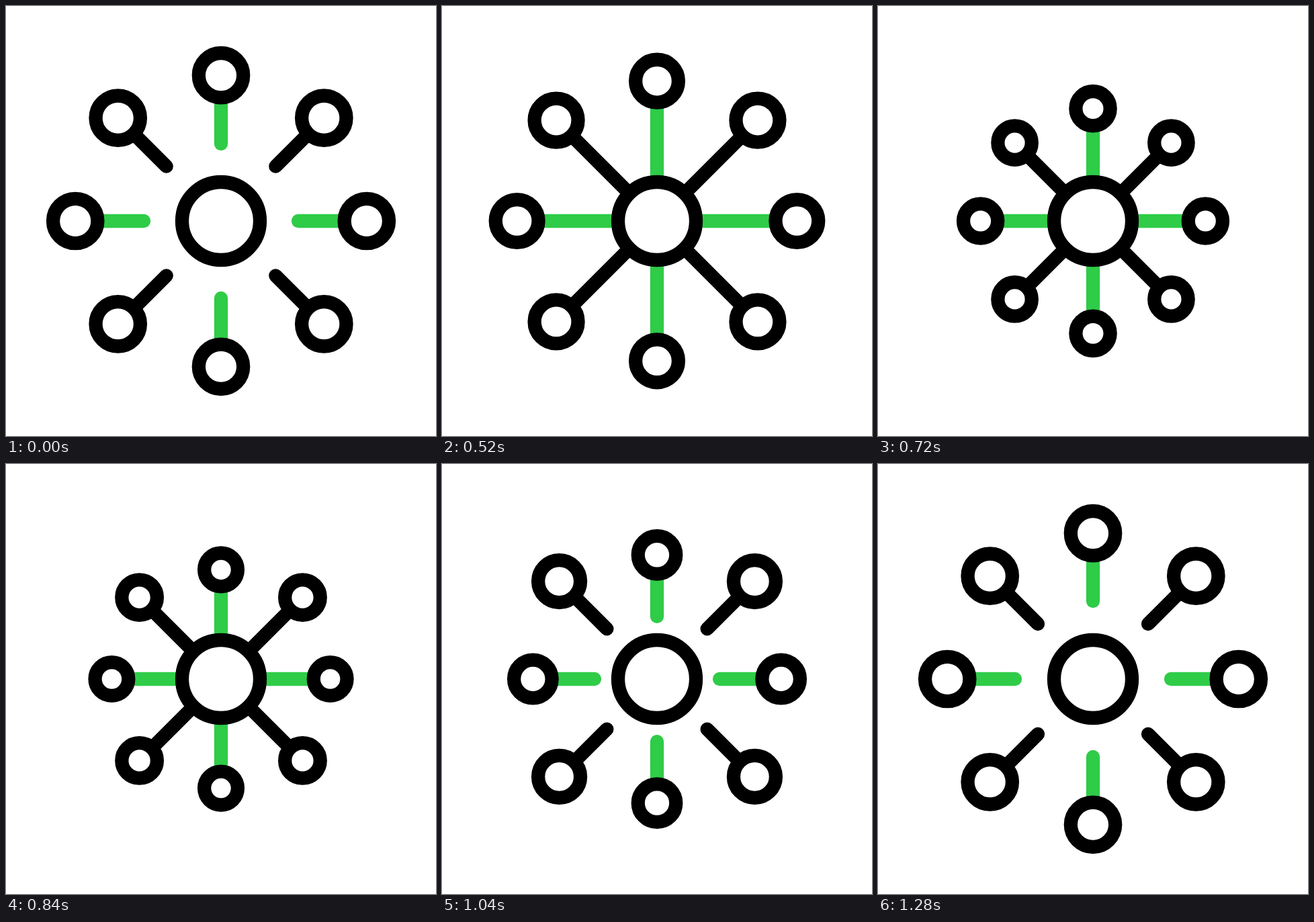
An HTML page with a canvas that plays this animation: 640x640 px, repeating every 1.64 s.

```html
<!DOCTYPE html>
<html lang="en">
<head>
<meta charset="utf-8">
<title>Hub and nodes</title>
<style>
  html, body { margin: 0; width: 100%; height: 100%; overflow: hidden; background: #fff; }
  canvas { display: block; width: 640px; height: 640px; }
</style>
</head>
<body>
<canvas id="stage" width="640" height="640"></canvas>
<script>
const ctx = document.getElementById('stage').getContext('2d');
const LOOP = 1640, STEP = 40;
const CENTER = 320, HUB = 58, ORBIT = 216.8, NODE = 33.2, STROKE = 20.3;
const BLACK = '#000', GREEN = '#2fcc48', WHITE = '#fff';

// scale: distance and size of the nodes; tip: inner end of the spoke at full scale
const groups = [
  {
    color: BLACK, turn: Math.PI / 4,
    scale: [[450, 1], [520, 0.978], [720, 0.7595], [755, 0.75], [920, 0.857], [1120, 0.989], [1200, 1]],
    tip: [[80, 115], [240, 95.7], [420, HUB], [690, HUB], [920, 100.9], [1120, 114.9], [1200, 116]]
  },
  {
    color: GREEN, turn: 0,
    scale: [[420, 1], [520, 0.961], [720, 0.772], [800, 0.75], [870, 0.75], [920, 0.763], [1120, 0.916], [1280, 1]],
    tip: [[80, 115], [240, 97.7], [440, HUB], [700, HUB], [920, 102.3], [1120, 112.2], [1280, 116]]
  }
];

const slope = (a, b) => (b[1] - a[1]) / (b[0] - a[0]);

// Tangent of a monotone curve, flat at ends and turning points
function tangent(keys, i) {
  if (i === 0 || i === keys.length - 1) return 0;
  const before = slope(keys[i - 1], keys[i]);
  const after = slope(keys[i], keys[i + 1]);
  return before * after > 0 ? 2 * before * after / (before + after) : 0;
}

function valueAt(keys, t) {
  if (t <= keys[0][0]) return keys[0][1];
  const i = keys.findIndex(key => key[0] > t) - 1;
  if (i < 0) return keys[keys.length - 1][1];
  const [t0, v0] = keys[i], [t1, v1] = keys[i + 1];
  const span = t1 - t0, u = (t - t0) / span, w = 1 - u;
  return v0 * w * w * (1 + 2 * u) + v1 * u * u * (3 - 2 * u)
    + span * u * w * (w * tangent(keys, i) - u * tangent(keys, i + 1));
}

function ring(x, radius) {
  ctx.beginPath();
  ctx.arc(x, 0, radius, 0, 2 * Math.PI);
  ctx.fillStyle = WHITE;
  ctx.fill();
  ctx.strokeStyle = BLACK;
  ctx.stroke();
}

function spoke(from, to, color) {
  ctx.beginPath();
  ctx.moveTo(from, 0);
  ctx.lineTo(to, 0);
  ctx.strokeStyle = color;
  ctx.stroke();
}

function drawGroup({ color, turn, scale, tip }, t) {
  const size = valueAt(scale, t);
  const inner = Math.max(HUB - 10, size * valueAt(tip, t));
  for (let i = 0; i < 4; i++) {
    ctx.save();
    ctx.rotate(turn + i * Math.PI / 2);
    spoke(inner, size * ORBIT, color);
    ring(size * ORBIT, size * NODE);
    ctx.restore();
  }
}

function draw(now) {
  let t = Math.floor(now % LOOP / STEP) * STEP;
  if (t === 960) t = 920; // this pose is held for two steps
  ctx.setTransform(1, 0, 0, 1, 0, 0);
  ctx.fillStyle = WHITE;
  ctx.fillRect(0, 0, 640, 640);
  ctx.translate(CENTER, CENTER);
  ctx.lineWidth = STROKE;
  ctx.lineCap = 'round';
  groups.forEach(group => drawGroup(group, t));
  ring(0, HUB);
}

const start = performance.now();
function frame() {
  draw(performance.now() - start);
  requestAnimationFrame(frame);
}
frame();
</script>
</body>
</html>
```
